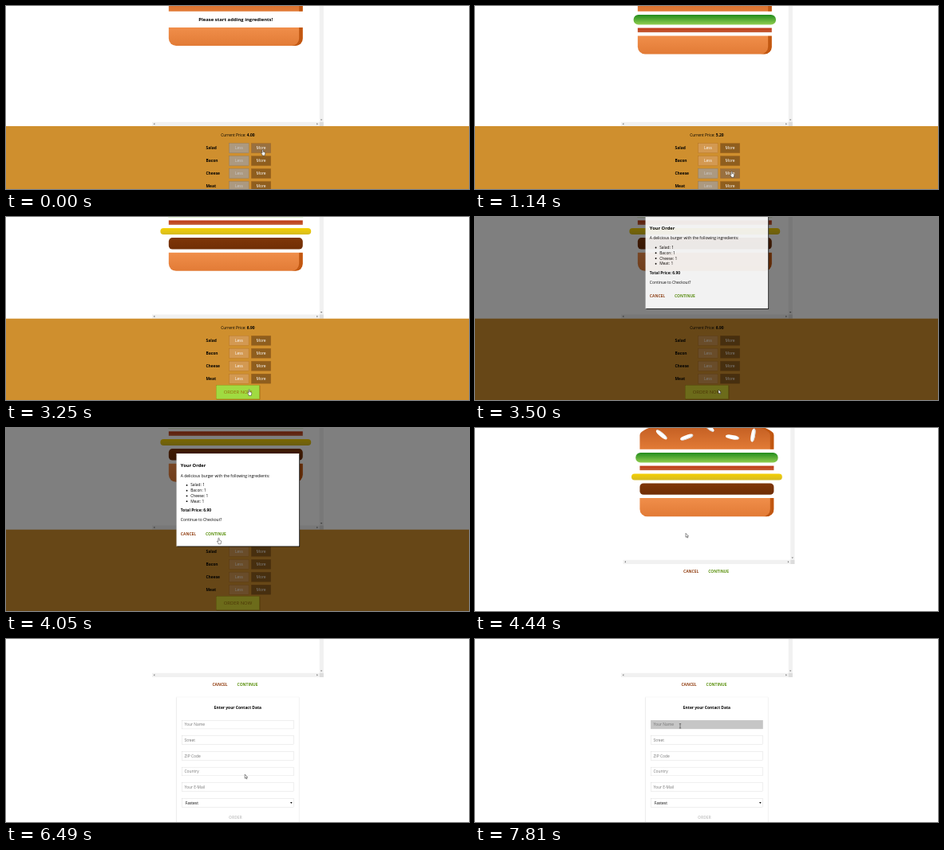
An HTML page for the animation above (7900 ms loop, 580 by 230 pixels).

```html
<!DOCTYPE html>
<html lang="en">
<head>
<meta charset="utf-8">
<title>Burger builder</title>
<style>
html, body { margin: 0; width: 100%; height: 100%; overflow: hidden; background: #fff; }
#stage { position: relative; width: 580px; height: 230px; overflow: hidden; background: #fff;
  font: 16px "Open Sans", "Noto Sans", sans-serif; color: #000; }
#stage * { box-sizing: border-box; }
.world { position: absolute; left: 0; top: 0; width: 0; height: 0; transform-origin: 0 0; }
.world > * { position: absolute; }

/* Burger */
.burger { left: -350px; top: -600px; width: 683px; height: 583px; overflow: hidden;
  text-align: center; font-weight: bold; font-size: 19.2px; }
.burger > div { position: relative; width: 80%; margin: 2% auto; }
.burger p { margin: 19.2px 0; }
.top { height: 20%; background: linear-gradient(#bc581e, #e27b36); border-radius: 50% 50% 0 0;
  box-shadow: inset -15px 0 #c15711; }
.burger .salad { width: 85%; height: 7%; background: linear-gradient(#228c1d, #91ce50); border-radius: 20px; }
.bacon { height: 3%; background: linear-gradient(#bf3813, #c45e38); }
.burger .cheese { width: 90%; height: 4.5%; background: linear-gradient(#f4d004, #d6bb22); border-radius: 20px; }
.meat { height: 8%; background: linear-gradient(#7f3608, #702e05); border-radius: 15px; }
.bottom { height: 13%; background: linear-gradient(#f08e4a, #e27b36); border-radius: 0 0 30px 30px;
  box-shadow: inset -15px 0 #c15711; }
.seed, .seed::before, .seed::after { position: absolute; background: #fff; border-radius: 40%; }
.seed { width: 10%; height: 15%; top: 50%; }
.seed::before, .seed::after { width: 100%; height: 100%; }
.s1 { left: 30%; transform: rotate(-20deg); box-shadow: inset -2px -3px #c9c9c9; }
.s1::after { content: ""; left: -170%; top: -260%; transform: rotate(60deg); box-shadow: inset -1px 2px #c9c9c9; }
.s1::before { content: ""; left: 180%; top: -50%; transform: rotate(60deg); box-shadow: inset -1px -3px #c9c9c9; }
.s2 { left: 64%; transform: rotate(10deg); box-shadow: inset -3px 0 #c9c9c9; }
.s2::before { content: ""; left: 150%; top: -130%; transform: rotate(90deg); box-shadow: inset 1px 3px #c9c9c9; }

/* Scrollbars */
.bar { background: #f1f1f1; }
.h { left: -350px; top: -17px; width: 683px; height: 17px; }
.v { left: 333px; top: -600px; width: 17px; height: 583px; }
.corner { left: 333px; top: -17px; width: 17px; height: 17px; background: #dcdcdc; }
.tri { position: absolute; border: 4px solid transparent; }
.h .l { left: 2px; top: 4px; border-right: 5px solid #777; }
.h .r { right: 2px; top: 4px; border-left: 5px solid #777; }
.v .d { left: 4px; bottom: 2px; border-top: 5px solid #777; }

/* Controls */
.panel { left: -1000px; top: 0; width: 2000px; height: 400px; padding: 10px 0; background: #cf8f2e;
  display: flex; flex-direction: column; align-items: center; }
.panel p { margin: 16px 0; line-height: 22px; }
.row { display: flex; align-items: center; height: 42px; margin: 5px 0; flex: none; }
.row b { width: 100px; padding: 10px; line-height: 22px; }
.row span { width: 80px; height: 40px; margin: 0 5px; border: 1px solid #aa6817; color: #fff;
  text-align: center; line-height: 38px; }
.less { background: #d39952; }
.row .less.off { background: #ac9980; border-color: #7e7365; color: #ccc; }
.more { background: #8f5e1e; }
.more.over { background: #99703f; }
.order { height: 58px; padding: 0 30px; line-height: 56px; font-size: 19.2px; color: #966909; flex: none;
  background: #dad735; border: 1px solid #966909; box-shadow: 2px 2px 2px #966909; }
.order.over { background: #a0db41; }

/* Dialog, checkout and form */
.shade { position: absolute; inset: 0; background: rgba(0, 0, 0, .5); }
.modal { left: -250px; top: 0; width: 500px; height: 379px; padding: 16px; background: #fff;
  border: 1px solid #ccc; box-shadow: 3px 3px 2px #000; line-height: 22px; }
.modal h3 { margin: 18.72px 0; font-size: 18.72px; line-height: 25.5px; }
.modal p, .modal ul { margin: 16px 0; }
.modal ul { padding-left: 40px; }
.choices { display: flex; gap: 39px; font-weight: bold; line-height: 22px; }
.choices :first-child { color: #944317; }
.choices :last-child { color: #5c9210; }
.modal .choices { margin-top: 36px; }
.checkout { left: -104px; top: 18px; }
.form { left: -250px; top: 81px; width: 500px; height: 560px; border: 1px solid #eee;
  box-shadow: 0 2px 3px #ccc; }
.form > * { position: absolute; }
.form h4 { left: 0; right: 0; top: 32px; margin: 0; text-align: center; line-height: 22px; }
.field { left: 20px; width: 458px; height: 36px; padding: 0 10px; border: 1px solid #ccc;
  background: #fff; color: #757575; line-height: 34px; }
.field.focus { background: #c6c6c6; }
.field.pick { color: #000; padding-left: 14px; }
.pick .tri { right: 6px; top: 14px; border-top: 7px solid #000; }
.caret { position: absolute; left: 10px; top: 7px; width: 1px; height: 20px; background: #000; }
.send { left: 212px; top: 480px; font-weight: bold; color: #ccc; line-height: 22px; }
#cursor { position: absolute; left: 0; top: 0; overflow: visible; }
</style>
</head>
<body>
<div id="stage">
  <div class="world" id="page">
    <div class="burger">
      <div class="top"><i class="seed s1"></i><i class="seed s2"></i></div>
      <p id="empty">Please start adding ingredients!</p>
      <div class="salad"></div><div class="bacon"></div><div class="cheese"></div><div class="meat"></div>
      <div class="bottom"></div>
    </div>
    <div class="bar h"><i class="tri l"></i><i class="tri r"></i></div>
    <div class="bar v"><i class="tri d"></i></div>
    <div class="corner"></div>
    <div class="panel" id="panel"><p>Current Price: <b id="price"></b></p></div>
    <div class="choices checkout" id="checkout"><span>CANCEL</span><span>CONTINUE</span></div>
    <div class="form" id="form"><h4>Enter your Contact Data</h4><span class="send">ORDER</span></div>
  </div>
  <div class="shade" id="shade"></div>
  <div class="world" id="dialog">
    <div class="modal">
      <h3>Your Order</h3>
      <p>A delicious burger with the following ingredients:</p>
      <ul><li>Salad: 1</li><li>Bacon: 1</li><li>Cheese: 1</li><li>Meat: 1</li></ul>
      <p><b>Total Price: 6.90</b></p>
      <p>Continue to Checkout?</p>
      <div class="choices"><span>CANCEL</span><span>CONTINUE</span></div>
    </div>
  </div>
  <svg id="cursor" width="1" height="1" fill="#fff" stroke="#222" stroke-width=".5" stroke-linejoin="round">
    <path id="hand" transform="translate(-.4) scale(.9 1)"
      d="M-.7 .3q.7-.7 1.4 0V2.8l2 .4q1 .3.9 1.2L3 6.2V7.5H-.6V6.6L-2.3 4.2q0-.8.9-.5l.7.7z"/>
    <path id="arrow" d="M0 0V5L1.2 4 2 5.8 2.8 5.4 2 3.7H3.5z"/>
    <path id="beam" fill="none" d="M-1.2-2.7H1.2M0-2.7V2.7M-1.2 2.7H1.2"/>
  </svg>
</div>
<script>
const LOOP = 7900, K = 0.307, CX = 290.4, CY = 151;
const ASK = 3340, CHECKOUT = 4440, FORM = 5690, FOCUS = 7350, BLINK = 7810;
const $ = id => document.getElementById(id);

function add(parent, cls, html) {
  const e = document.createElement('div');
  e.className = cls;
  e.innerHTML = html;
  return parent.appendChild(e);
}

const items = [
  { name: 'Salad', time: 60, cost: .5 },
  { name: 'Bacon', time: 760, cost: .7 },
  { name: 'Cheese', time: 1340, cost: .4 },
  { name: 'Meat', time: 2210, cost: 1.3 }
];
items.forEach((it, i) => {
  const row = add($('panel'), 'row', `<b>${it.name}</b><span class="less">Less</span><span class="more">More</span>`);
  [, it.less, it.more] = row.children;
  it.layer = document.querySelector('.' + it.name.toLowerCase());
  it.y = 90 + 52 * i;
  it.tip = [322, 180.5 + 15 * i];
});
const order = add($('panel'), 'order', 'ORDER NOW');

const fields = ['Your Name', 'Street', 'ZIP Code', 'Country', 'Your E-Mail', 'Fastest'].map((name, i) => {
  const f = add($('form'), 'field', name);
  f.style.top = 93.5 + 64 * i + 'px';
  return f;
});
fields[5].classList.add('pick');
add(fields[5], 'tri', '');
const caret = add(fields[0], 'caret', '');

// Moves: start, duration, goal
const pointer = [
  ...items.slice(1).map((it, i) => [items[i].time + 150, 400, it.tip]),
  [2750, 400, [305, 217]],
  [3640, 560, [264, 132.3]],
  [4700, 350, [384, 160]],
  [5050, 400, [305, 178.5]],
  [6450, 660, [257, 109.3]]
];
const panelScroll = [[2340, 290, [-23.3]]];
const formScroll = [[5860, 170, [0]], [6030, 420, [-103]]];

function ease(t, start, length, power = 2) {
  const u = Math.min(1, Math.max(0, (t - start) / length));
  return 1 - (1 - u) ** power;
}
const follow = (from, moves, t) => moves.reduce((p, [start, length, goal]) =>
  p.map((v, i) => v + (goal[i] - v) * ease(t, start, length)), from);

const show = (e, on) => { e.style.display = on ? '' : 'none'; };
const place = (e, x, y) => { e.style.transform = `translate(${x}px, ${y}px) scale(${K})`; };

function render(t) {
  const building = t < CHECKOUT, asking = t >= ASK && building, filling = t >= FORM;
  const [dy] = building ? follow([0], panelScroll, t) : follow([20], formScroll, t);
  const [x, y] = follow(items[0].tip, pointer, t);
  const near = (cx, cy, w, h) => Math.abs(x - cx) < w / 2 && Math.abs(y - cy) < h / 2;
  const onPanel = building && !asking;

  // The page is wider while it has no scrollbar of its own
  place($('page'), CX + (building || filling ? 0 : 8.5 * K), CY + dy);
  show($('panel'), building);
  show($('checkout'), !building);
  show($('form'), filling);

  let price = 4, hand = false;
  for (const it of items) {
    const has = t >= it.time;
    const over = onPanel && near(319.5, CY + dy + it.y * K, 24.6, 12.3);
    if (has) price += it.cost;
    hand = hand || over;
    show(it.layer, has);
    it.less.classList.toggle('off', !has);
    it.more.classList.toggle('over', over);
  }
  $('price').textContent = price.toFixed(2);
  show($('empty'), t < items[0].time);

  const onOrder = onPanel && near(291, CY + dy + 301 * K, 54.5, 18);
  order.classList.toggle('over', onOrder);

  const drop = ease(t, ASK, 300, 3);
  show($('shade'), asking);
  show($('dialog'), asking);
  place($('dialog'), CX, 32 - 336 * (1 - drop));
  $('dialog').style.opacity = drop;

  fields[0].classList.toggle('focus', t >= FOCUS);
  show(caret, t >= FOCUS && t < BLINK);

  const beam = t >= 6700;
  const onContinue = asking ? near(263.5, 133, 32, 12) : t > 5350 && t < 6460;
  hand = hand || onOrder || onContinue;
  show($('beam'), beam);
  show($('hand'), hand && !beam);
  show($('arrow'), !hand && !beam);
  $('cursor').style.transform = `translate(${x}px, ${y}px)`;
}

const start = performance.now();
(function frame() {
  render((performance.now() - start) % LOOP);
  requestAnimationFrame(frame);
})();
</script>
</body>
</html>
```
